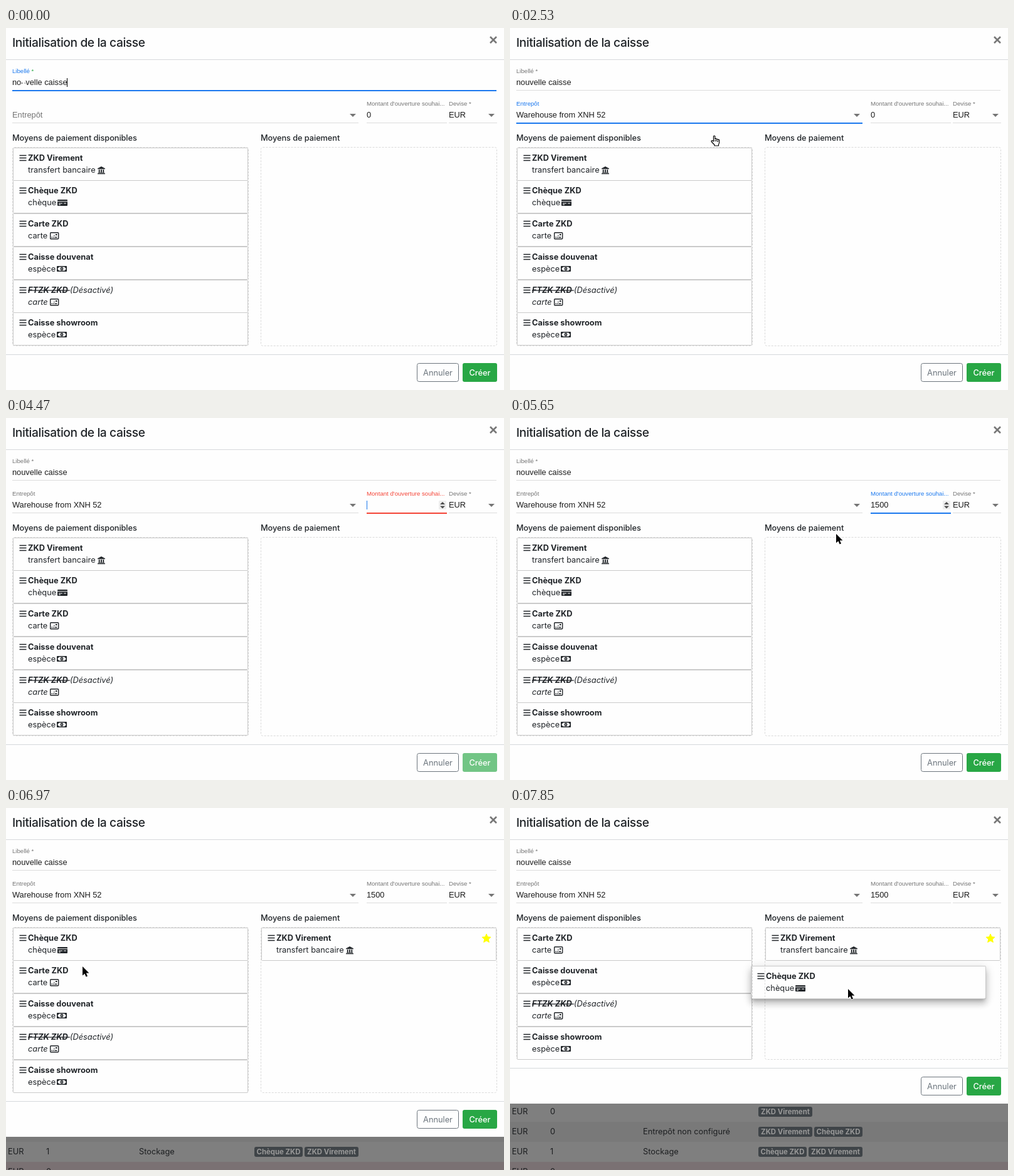
Write an HTML page that moves like this. It is 794 px wide and 578 px high and loops after 7.99 s.

```html
<!DOCTYPE html>
<html lang="fr">
<head>
<meta charset="utf-8">
<title>Initialisation de la caisse</title>
<style>
html, body { margin: 0; width: 100%; height: 100%; overflow: hidden; background: #fefefe; }
svg { display: block; width: 794px; height: 578px; }
text { white-space: pre; }
.ui { font: 12.8px Inter, sans-serif; fill: #212529; }
.field { font: 12.8px "Liberation Sans", Arial, sans-serif; fill: #1c1c1c; }
.small { font: 9.65px "Liberation Sans", Arial, sans-serif; fill: #757575; }
.option { font: 12px "Liberation Sans", Arial, sans-serif; fill: #1c1c1c; }
.head { font-weight: 500; letter-spacing: -.08px; }
.title { font: 500 19.2px Inter, sans-serif; fill: #212529; letter-spacing: -.4px; }
.bold { font-weight: 700; }
.off { font-style: italic; }
.back { fill: #1d1f21; }
.badge { font: 700 11.4px Inter, sans-serif; fill: #989898; }
.line { fill: #dcdcdc; }
.focus { fill: #1a78ee; }
.zone { fill: none; stroke: #dadada; stroke-dasharray: 3 2; }
.edge { fill: none; stroke: #cacaca; }
.mark { fill: #757575; }
foreignObject { overflow: visible; }
#panelBox { width: 578px; height: 216px; background: #fff; border-radius: 0 0 4px 0;
  box-shadow: 0 2px 4px -1px rgba(0,0,0,.25), 0 3px 4px rgba(0,0,0,.2); }
#lift { width: 375px; height: 53px; border-radius: 4px;
  box-shadow: 0 5px 5px -3px rgba(0,0,0,.2), 0 8px 10px 1px rgba(0,0,0,.14), 0 3px 14px 2px rgba(0,0,0,.12); }
</style>
</head>
<body>
<svg viewBox="0 0 794 578" xmlns="http://www.w3.org/2000/svg">
  <g id="table"></g>
  <rect id="modal" width="794" fill="#fefefe"/>

  <text class="title" x="10" y="30">Initialisation de la caisse</text>
  <path d="M772 14L782 24M782 14L772 24" stroke="#777" stroke-width="2.6"/>
  <rect y="50" width="794" height="1" fill="#d6d9dc"/>

  <text class="small" x="10" y="72" id="nameLabel">Libellé <tspan id="star">*</tspan></text>
  <text class="field" x="10" y="91">nouvelle caisse</text>
  <rect class="line" x="10" y="99" width="772" height="1"/>
  <rect class="focus" y="99" height="2" id="nameLine"/>
  <rect x="97" y="80" width="1" height="14" id="nameCaret"/>

  <text class="small" x="10" id="depotLabel">Entrepôt</text>
  <text class="field" x="10" y="143" id="depot"></text>
  <rect class="line" x="10" y="151" width="552" height="1"/>
  <rect class="focus" y="151" height="2" id="depotLine"/>
  <path class="mark" d="M548 137h10l-5 5z"/>

  <text class="small" x="575" y="124" id="sumLabel">Montant d'ouverture souhai...</text>
  <text class="field" x="575" y="143" id="sum"></text>
  <rect class="line" x="575" y="151" width="128" height="1"/>
  <rect class="focus" y="151" height="2" id="sumLine"/>
  <rect y="132" width="1" height="14" fill="#1a78ee" id="sumCaret"/>
  <g id="spinner">
    <rect x="690" y="132" width="12" height="14" rx="1" fill="#eee"/>
    <path d="M692 138l4-4 4 4zM692 140.500h8l-4 4z" fill="#4c4c4c"/>
  </g>

  <text class="small" x="706" y="124">Devise *</text>
  <text class="field" x="706" y="143">EUR</text>
  <rect class="line" x="706" y="151" width="77" height="1"/>
  <path class="mark" d="M769 137h10l-5 5z"/>

  <text class="ui head" x="10" y="180">Moyens de paiement disponibles</text>
  <text class="ui head" x="406" y="180">Moyens de paiement</text>
  <rect class="zone" x="10.500" y="190.500" width="376" rx="3"/>
  <rect class="zone" x="406.500" y="190.500" width="376" rx="3"/>

  <g id="footer">
    <rect y="521" width="794" height="1" fill="#d6d9dc"/>
    <rect x="655.500" y="535.500" width="66" height="29" rx="3" fill="none" stroke="#6c757d"/>
    <text class="ui" x="688.500" y="555" text-anchor="middle" style="fill:#6c757d">Annuler</text>
    <g id="create">
      <rect x="728" y="535" width="55" height="30" rx="3" fill="#28a745"/>
      <text class="ui" x="755.500" y="555" text-anchor="middle" style="fill:#fff;font-weight:500">Créer</text>
    </g>
  </g>

  <g id="cards"></g>
  <foreignObject id="liftBox" width="375" height="53"><div id="lift"></div></foreignObject>

  <g id="panel">
    <foreignObject y="121" width="578" height="216"><div id="panelBox"></div></foreignObject>
    <rect y="121" width="578" height="36" fill="#f3f3f3"/>
    <rect y="157" width="578" height="36" fill="#f5f5f5" id="hover"/>
  </g>

  <g id="arrow"><path d="M0 0V14.500L3.400 11.400 5.600 16.600 8 15.600 5.800 10.500H10.400Z" stroke="#fff" stroke-width="1.200" paint-order="stroke"/></g>
  <g id="hand"><path transform="translate(-5 -1)" fill="#fff" stroke="#000" stroke-width="1.200" stroke-linejoin="round"
    d="M4.500 10V2.200a1.200 1.200 0 0 1 2.400 0V6.500a1.200 1.100 0 0 1 2.300 0V7a1.200 1.100 0 0 1 2.300.200V8a1.100 1.100 0 0 1 2.200.300V11q0 2.500-1.200 4v2H6v-1.500Q4 13.500 1.200 10.500A1.200 1.200 0 0 1 3 9ZM7 8v2M9.200 8v2M11.400 9v2"/></g>
  <g id="beam" fill="none" stroke-linecap="round">
    <path id="beamPath" d="M-3-7.500Q0-7.500 0-5.500 0-7.500 3-7.500M0-5.500V5.500M-3 7.500Q0 7.500 0 5.500 0 7.500 3 7.500M-2 2.500H2" stroke="#fff" stroke-width="3"/>
    <use href="#beamPath" style="stroke:#000"/>
  </g>
</svg>
<script>
const LOOP = 7990, PITCH = 52.75, BLUE = '#1a78ee', RED = '#f44336', GREY = '#757575';
const $ = id => document.getElementById(id);

function add(parent, tag, attrs = {}, text = '') {
  const node = document.createElementNS('http://www.w3.org/2000/svg', tag);
  set(node, attrs);
  node.textContent = text;
  return parent.appendChild(node);
}
function set(node, attrs) {
  for (const key in attrs) node.setAttribute(key, attrs[key]);
}
const show = (node, on) => { node.style.display = on ? '' : 'none'; };
const move = (node, x, y) => node.setAttribute('transform', `translate(${x} ${y})`);
const clamp = v => Math.max(0, Math.min(1, v));
const within = (t, from, to) => t >= from && t < to;
const latest = (steps, t) => steps.filter(s => s[0] <= t).pop()[1];

const DEPOT = 'Warehouse from XNH 52';
const WIRE = 'ZKD Virement', CHECK = 'Chèque ZKD';

const icons = {
  bank: [135, 30, '<path d="M0 3.200L6 0l6 3.200v1H0zM1.800 5h1.800v4.500H1.800zM5.100 5h1.800v4.500H5.100zM8.400 5h1.800v4.500H8.400zM1 9.500h10v1H1zM0 11h12v1.200H0z"/>'],
  check: [71, 31, '<rect width="16" height="10" rx="1"/><path d="M0 2.800H16M2 6h6M10 6h4M2 8h3" stroke="#fff"/>'],
  card: [59, 30, '<rect x=".7" y=".7" width="13" height="10" rx="1" fill="none" stroke="#212529" stroke-width="1.400"/><path d="M9 3h2.500v2H9zM2.500 7.500H4V9H2.500zM5 7.500h1.500V9H5zM7.500 7.500h4V9h-4zM6 5h1.500v1H6z"/>'],
  cash: [70, 31, '<rect width="16" height="9" rx="1"/><path d="M3.500 1.500h9q0 1.500 1.800 1.500v3q-1.800 0-1.800 1.500h-9Q3.500 6 1.700 6V3q1.800 0 1.800-1.500z" fill="#fff"/><ellipse cx="8" cy="4.500" rx="2.300" ry="2.700"/><path d="M8 3.200V5.800" stroke="#fff"/>']
};

const cards = [
  [WIRE, 'transfert bancaire', 'bank'],
  [CHECK, 'chèque', 'check'],
  ['Carte ZKD', 'carte', 'card'],
  ['Caisse douvenat', 'espèce', 'cash'],
  ['FTZK ZKD ', 'carte', 'card', true],
  ['Caisse showroom', 'espèce', 'cash']
].map(([name, kind, icon, off]) => {
  const g = add($('cards'), 'g');
  const style = off ? ' off' : '';
  add(g, 'rect', { class: 'edge', x: .5, y: .5, width: 374, height: 52, rx: 1 });
  add(g, 'path', { d: 'M10.500 12.500h11M10.500 16.500h11M10.500 20.500h11', stroke: '#212529', 'stroke-width': 1.5 });
  const label = add(g, 'text', { class: 'ui' + style, x: 24, y: 21 });
  const title = add(label, 'tspan', { class: 'bold' }, name);
  if (off) {
    title.setAttribute('text-decoration', 'line-through');
    add(label, 'tspan', {}, '(Désactivé)');
  }
  add(g, 'text', { class: 'ui' + style, x: 24, y: 40 }, kind);
  const [x, y, art] = icons[icon];
  const pic = add(g, 'g', { transform: `translate(${x} ${y})`, fill: '#212529' });
  pic.innerHTML = art;
  const points = Array.from({ length: 10 }, (_, i) => {
    const r = i % 2 ? 3.4 : 7.4, a = i * Math.PI / 5;
    return [359 + r * Math.sin(a), 17.5 - r * Math.cos(a)];
  });
  const star = add(g, 'polygon', { points: points.join(' '), fill: '#ff0', stroke: '#ff0', 'stroke-linejoin': 'round' });
  return { g, star };
});

['', DEPOT, 'Stockage', 'Entrepôt non configuré', 'Concession', 'Showroom from DXM52']
  .forEach((name, i) => add($('panel'), 'text', { class: 'option', x: 10, y: 143 + 36 * i }, name));

[['0', '', WIRE], ['0', 'Entrepôt non configuré', WIRE, CHECK], ['1', 'Stockage', CHECK, WIRE], ['0', '']]
  .forEach(([count, place, ...tags], i) => {
    const y = 489 + 32 * i, table = $('table');
    add(table, 'rect', { y: y - 20, width: 794, height: 32, fill: ['#7f7f7f', '#797979', '#7f7f7f', '#7a7173'][i] });
    [['EUR', 3], [count, 64], [place, 212]].forEach(([s, x]) => add(table, 'text', { class: 'ui back', x, y }, s));
    let x = 396;
    for (const tag of tags) {
      const width = tag === WIRE ? 86 : 77;
      add(table, 'rect', { x, y: y - 12, width, height: 16, rx: 3, fill: '#3f4448' });
      add(table, 'text', { class: 'badge', x: x + width / 2, y, 'text-anchor': 'middle' }, tag);
      x += width + 3;
    }
  });

const SHORT = [0, 9, 30, 33, 36, 41, 43, 45, 49, 51, 53];
function snap(t) {
  let start = 0;
  for (let i = 0; ; i++) {
    const next = start + (SHORT.includes(i) ? 140 : 150);
    if (t < next) return start;
    start = next;
  }
}

const path = [
  [0, 28, 83], [290, 60, 106], [590, 230, 165], [740, 345, 176], [890, 435, 158], [1040, 457, 142], [1340, 457, 142],
  [1480, 409, 165], [1930, 340, 172], [2380, 310, 174], [2530, 325, 172], [2980, 625, 142], [3130, 637, 140], [5060, 637, 140],
  [5650, 520, 185], [5800, 370, 214], [5950, 241, 230], [6100, 241, 230], [6240, 330, 235], [6390, 505, 246],
  [6530, 560, 238], [6680, 430, 245], [6820, 255, 252], [6970, 122, 253], [7260, 166, 228], [7410, 172, 229],
  [7560, 260, 241], [7700, 420, 268], [7850, 539, 289]
];
function pointer(t) {
  const i = path.findIndex(p => p[0] > t);
  if (i < 0) return path[path.length - 1].slice(1);
  const [a, b] = [path[i - 1], path[i]], k = (t - a[0]) / (b[0] - a[0]);
  return [1, 2].map(n => Math.round(a[n] + (b[n] - a[n]) * k));
}
const shapes = [[0, 'beam'], [290, 'arrow'], [1190, 'hand'], [2600, 'arrow'], [3100, 'beam'], [4180, ''], [5650, 'arrow']];
const sums = [[0, '0'], [4180, ''], [4480, '1'], [4630, '15'], [4770, '150'], [4920, '1500']];
const drags = [
  { id: 0, x: 241, y: 230, grab: 6100, drop: 6600 },
  { id: 1, x: 166, y: 228, grab: 7300, drop: LOOP }
];

// Underline grows from its centre, starting at half width.
function underline(node, x, width, t, from, to) {
  const p = clamp((t - from) / 300), w = width * (1 - .5 * (1 - p) ** 2);
  show(node, within(t, from, to));
  set(node, { x: x + (width - w) / 2, width: w, height: p < .4 ? 1 : 2 });
}

function drawFields(t) {
  const named = t < 740;
  $('nameLabel').style.fill = named ? BLUE : GREY;
  $('star').style.fill = named ? '#28a745' : GREY;
  underline($('nameLine'), 10, 772, t, -300, 740);
  show($('nameCaret'), named);

  const up = clamp((t - 690) / 300);
  set($('depotLabel'), { y: 143 - 19 * up });
  $('depotLabel').style.fontSize = 12.8 - 3.15 * up + 'px';
  $('depotLabel').style.fill = within(t, 740, 3060) ? BLUE : GREY;
  $('depot').textContent = t >= 2530 ? DEPOT : '';
  underline($('depotLine'), 10, 552, t, 690, 3060);
  show($('panel'), within(t, 1480, 2530));
  show($('hover'), t >= 1630);
  $('hover').style.fill = t >= 2380 ? '#e6e6e6' : '#f5f5f5';

  const sum = latest(sums, t), color = sum ? BLUE : RED, active = within(t, 3060, 6000);
  $('sum').textContent = sum;
  $('sumLabel').style.fill = active ? color : GREY;
  $('sumLine').style.fill = color;
  underline($('sumLine'), 575, 128, t, 3060, 6000);
  show($('spinner'), active);
  show($('sumCaret'), within(t, 3060, 3730) || within(t, 4180, 5060));
  set($('sumCaret'), { x: 575 + Math.round(7.12 * sum.length) });
  $('create').style.opacity = sum ? 1 : .65;
}

function drawCards(t, [px, py]) {
  let left = cards.map((_, i) => i), shift = 0, held = null;
  const right = [];
  const place = (id, x, y) => {
    move(cards[id].g, x, y);
    show(cards[id].star, id === right[0]);
  };
  for (const d of drags) {
    if (t < d.grab) continue;
    if (t >= d.drop) right.push(d.id);
    else held = d;
    if (!held || px > 406) {
      left = left.filter(id => id !== d.id);
      shift += PITCH;
    }
  }
  left.forEach((id, i) => place(id, 11, Math.floor(191 + PITCH * i)));
  right.forEach((id, i) => place(id, 407, Math.floor(191 + PITCH * i)));
  show($('liftBox'), held);
  if (held) {
    const x = 11 + px - held.x, y = 191 + py - held.y;
    place(held.id, x, y);
    set($('liftBox'), { x, y });
  }
  shift = Math.round(shift);
  set($('modal'), { height: 578 - shift });
  move($('footer'), 0, -shift);
  document.querySelectorAll('.zone').forEach(z => set(z, { height: 317 - shift }));
}

function draw(time) {
  const t = snap(time % LOOP), spot = pointer(t), shape = latest(shapes, t);
  drawFields(t);
  drawCards(t, spot);
  for (const id of ['arrow', 'hand', 'beam']) {
    show($(id), id === shape);
    move($(id), ...spot);
  }
}

let begin;
function tick(now) {
  begin ??= now;
  draw(now - begin);
  requestAnimationFrame(tick);
}
draw(0);
requestAnimationFrame(tick);
</script>
</body>
</html>
```
